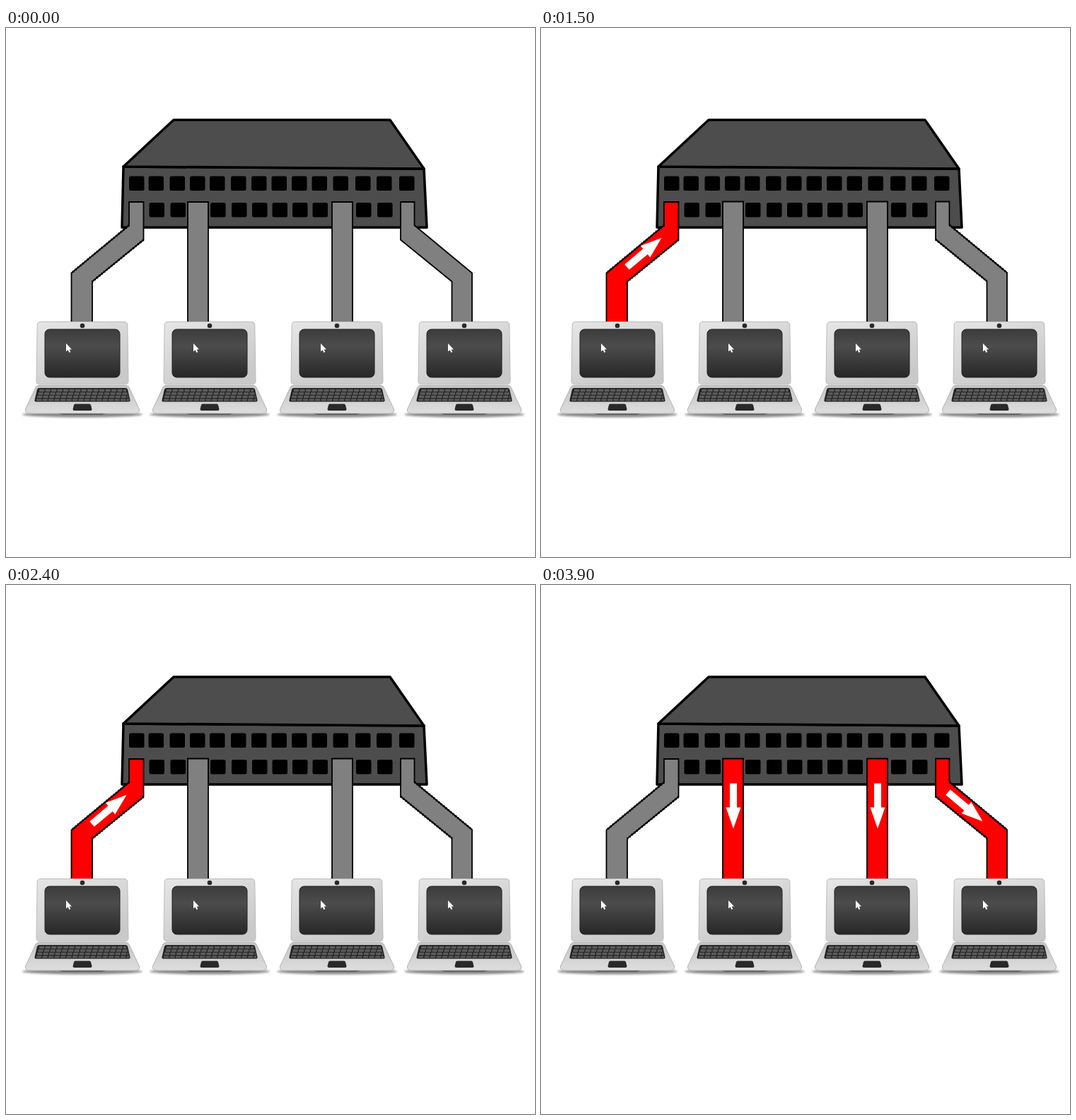
Recreate the animation shown at these times as an HTML page. Size 748 by 748 pixels, loop 4500 ms.

```html
<!DOCTYPE html>
<html lang="en">
<head>
<meta charset="utf-8">
<title>Network hub</title>
<style>
  html, body { margin: 0; width: 100%; height: 100%; overflow: hidden; background: #fff; }
  svg { display: block; width: 748px; height: 748px; }
  .cable { fill: #808080; stroke: #000; stroke-width: 1.8; }
  .cable.live { fill: #f00; }
  .rough { fill: none; stroke: #000; stroke-width: 3; stroke-dasharray: 2 2.4; }
  .arrow { fill: #fff; }
</style>
</head>
<body>
<svg viewBox="0 0 748 748">
  <defs>
    <linearGradient id="shell" x2="0.6" y2="1">
      <stop stop-color="#e6e6e6"/><stop offset="1" stop-color="#c9c9c9"/>
    </linearGradient>
    <linearGradient id="screen" x2="0" y2="1">
      <stop stop-color="#3c3c3c"/><stop offset=".35" stop-color="#4c4c4c"/><stop offset="1" stop-color="#272727"/>
    </linearGradient>
    <linearGradient id="base" x2="0" y2="1">
      <stop stop-color="#c4c4c4"/><stop offset="1" stop-color="#dedede"/>
    </linearGradient>
    <filter id="soft" x="-10%" y="-100%" width="120%" height="300%"><feGaussianBlur stdDeviation="1.8"/></filter>
    <path id="arrow" d="M-5 0H5V34H10.5L0 64L-10.5 34H-5Z"/>
    <g id="laptop">
      <ellipse cx="108" cy="546.5" rx="85" ry="4" fill="#888" filter="url(#soft)"/>
      <path d="M70 544H146L136 546.5H80Z" fill="#333"/>
      <path d="M46 505.500H170Q173 505.500 174.500 509L188.500 539Q189.500 545 182 545H34Q26.500 545 27.500 539L41.500 509Q43 505.500 46 505.500Z" fill="url(#base)" stroke="#b4b4b4"/>
      <path d="M47 509H169Q171 509 172 511L175.500 526Q176 528.500 173 528.500H43Q40 528.500 40.500 526L44 511Q45 509 47 509Z" fill="#222"/>
      <g fill="none" stroke="#5c5c5c" stroke-width="3.400" stroke-dasharray="7.200 1.300">
        <path d="M47 512.500H170"/><path d="M45.500 517H172"/><path d="M44 521.500H173"/>
        <path d="M43 525.800H174" stroke-width="2.800"/>
      </g>
      <path d="M98 531.500H118Q119.500 531.500 120 533L121.500 539Q121.500 541 119.500 541H96.500Q94.500 541 94.500 539L96 533Q96.500 531.500 98 531.500Z" fill="#292929"/>
      <path d="M49 415.500H167Q171.500 415.500 171.800 420L173 499Q173 504 168 504H48Q43 504 43 499L44.200 420Q44.500 415.500 49 415.500Z" fill="url(#shell)" stroke="#bbb"/>
      <rect x="55" y="426" width="106" height="68" rx="6.500" fill="url(#screen)" stroke="#222"/>
      <circle cx="108" cy="421" r="3.300" fill="#292929"/>
      <path d="M85 446V457.500L87.500 455.300L89.500 459L91.300 458L89.600 454.500H93Z" fill="#fff"/>
    </g>
  </defs>

  <g fill="#4d4d4d" stroke="#000" stroke-width="3.500" stroke-linejoin="round">
    <path d="M166 196L591 199L595 282H164Z"/>
    <path d="M237 130H543L591 199L166 196Z"/>
  </g>
  <g id="ports"></g>
  <g id="cables"></g>
  <g id="laptops"></g>
</svg>
<script>
const STEP = 1500;
const byId = id => document.getElementById(id);

const columns = [174, 201.5, 231.5, 260, 288, 318, 347, 375.500, 404, 432.500, 462.500, 494, 524, 556];
const port = (x, y) => `<rect x="${x}" y="${y}" width="21.500" height="20.500" rx="2.500"/>`;
byId('ports').innerHTML = columns.map((x, i) =>
  port(x, 209.500) + (i && i < 13 ? port(x + 1, 247) : '')).join('');

const straight = x => `M${x} 246H${x + 29}V418H${x}Z`;
const cables = [
  { shape: 'M174 246H194.500V299.500L122 358.500V418H92.500V346.500L174 279Z',
    rough: 'M174 279L92.500 346.500M194.500 299.500L122 358.500',
    arrow: 'translate(121.500 338) rotate(230)' },
  { shape: straight(257), arrow: 'translate(272 281)' },
  { shape: straight(461), arrow: 'translate(476 281)' },
  { shape: 'M558 246H577.500V279L659 346.500V418H630.500V358.500L558 299.500Z',
    rough: 'M577.500 279L659 346.500M558 299.500L630.500 358.500',
    arrow: 'translate(575.500 293.500) rotate(-50)' }
];
byId('cables').innerHTML = cables.map(c =>
  `<g><path class="cable" d="${c.shape}"/><path class="rough" d="${c.rough || ''}"/>
   <use class="arrow" href="#arrow" transform="${c.arrow}"/></g>`).join('');
byId('laptops').innerHTML = cables.map((c, i) => `<use href="#laptop" x="${i * 180}"/>`).join('');

const groups = [...byId('cables').children];

// Idle, then the first computer sends, then the hub repeats to all others.
function draw(now) {
  const phase = Math.floor(now / STEP) % 3;
  groups.forEach((group, i) => {
    const [cable, rough, arrow] = group.children;
    const live = phase === (i ? 2 : 1);
    cable.classList.toggle('live', live);
    arrow.style.display = live ? '' : 'none';
    rough.style.display = i && !phase ? 'none' : '';
    group.setAttribute('transform', i && phase ? 'translate(0 -.5)' : '');
  });
}

const start = performance.now();
function tick() {
  draw(performance.now() - start);
  requestAnimationFrame(tick);
}
tick();
</script>
</body>
</html>
```
